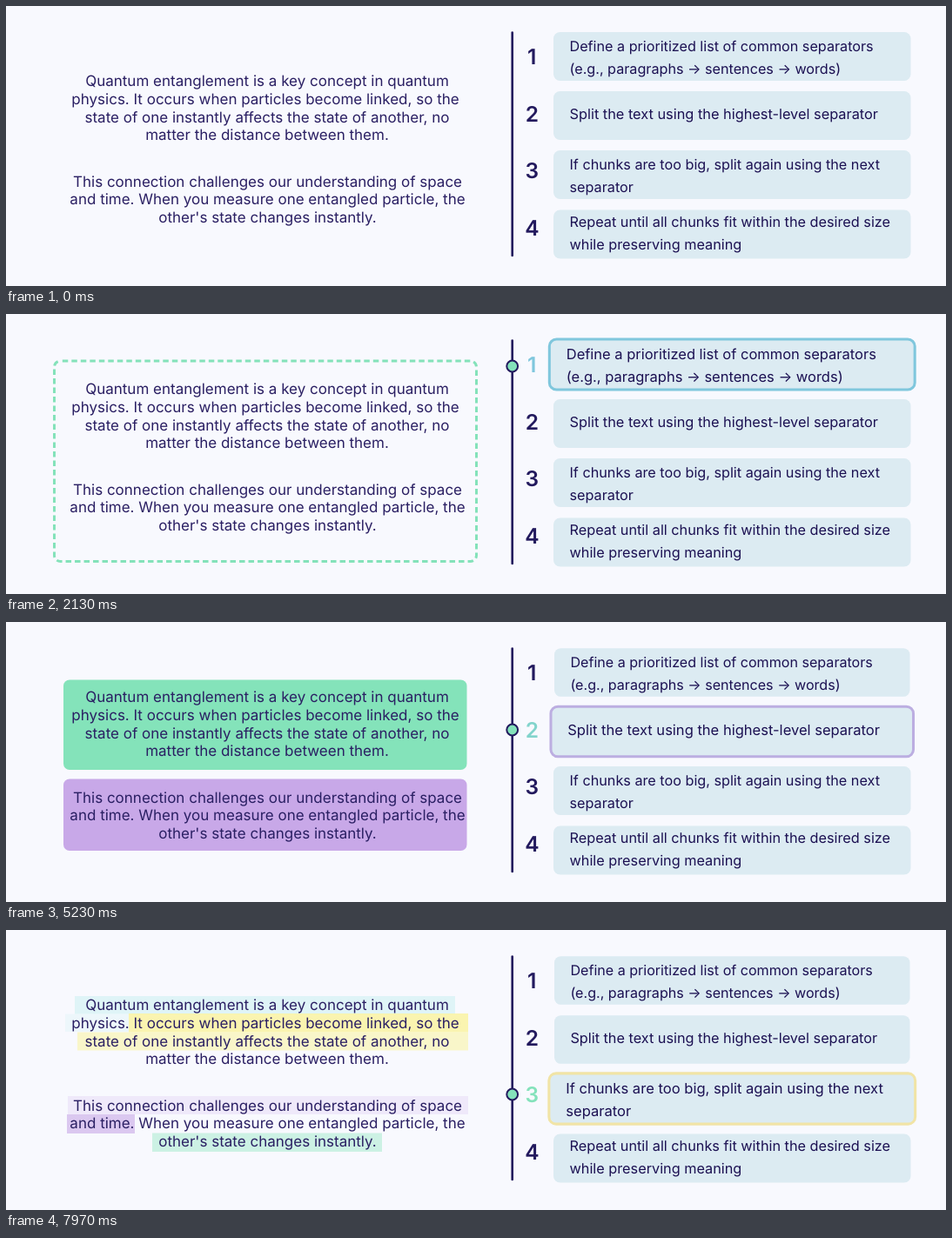
Write an HTML page that moves like this. It is 1080 px wide and 322 px high and loops after 8 s.

```html
<!DOCTYPE html>
<html lang="en">
<head>
<meta charset="utf-8">
<title>Recursive text splitting</title>
<style>
  html, body { margin: 0; width: 100%; height: 100%; overflow: hidden; background: #f8f9fe; }
  svg { display: block; width: 100vw; height: 100vh; }
  text { font-family: Inter, sans-serif; text-rendering: geometricPrecision; }
  .passage { font-size: 17px; fill: #2a1f63; text-anchor: middle; }
  .label { fill: #1b1052; }
  .number { font-size: 24.5px; font-weight: 600; text-anchor: middle; }
</style>
</head>
<body>
<svg id="stage" viewBox="0 0 1080 322"></svg>
<script>
const LOOP = 8000;
const NAVY = [35, 26, 94], GREEN = [132, 226, 186], BLUE = [128, 199, 221];
const LILAC = [188, 174, 225], YELLOW = [241, 228, 166];
const AXIS = 581.7;
const stage = document.getElementById('stage');

function add(parent, tag, attrs, text) {
  const el = document.createElementNS('http://www.w3.org/2000/svg', tag);
  set(el, attrs);
  if (text) el.textContent = text;
  parent.append(el);
  return el;
}
function set(el, attrs) {
  for (const key in attrs) el.setAttribute(key, attrs[key]);
}

const clamp = p => Math.min(1, Math.max(0, p));
const smooth = p => (1 - Math.cos(Math.PI * clamp(p))) / 2;
const ramp = (t, from, to) => clamp((t - from) / (to - from));
const backIn = p => 2.70158 * p ** 3 - 1.70158 * p ** 2;
const mix = (a, b, p) => a.map((v, i) => v + (b[i] - v) * p);
const rgb = c => `rgb(${c.map(Math.round)})`;
const zoom = (x, y, s) => `translate(${x} ${y}) scale(${s}) translate(${-x} ${-y})`;

// Smooth interpolation through [time, value] points
function track(t, points) {
  for (let i = 1; i < points.length; i++) {
    const [t0, a] = points[i - 1], [t1, b] = points[i];
    if (t < t1) return a + (b - a) * smooth((t - t0) / (t1 - t0));
  }
  return points[points.length - 1][1];
}

// Pop in and out with overshoot: how far the part is from its full pose
function pop(t, start, end) {
  const into = clamp((t - start) / 600), out = clamp((t - end) / 610);
  return {
    shrink: out > 0 ? backIn(out) : backIn(1 - into),
    alpha: out > 0 ? 1 - out ** 1.4 : clamp(into * 2)
  };
}

// Highlights behind the passage
const frame = add(stage, 'rect', {
  x: 55.5, y: 54, width: 485, height: 230.5, rx: 7, fill: 'none',
  stroke: rgb(GREEN), 'stroke-width': 3, 'stroke-dasharray': '6.5 4'
});
const blocks = add(stage, 'g', {});
add(blocks, 'rect', { x: 66, y: 66.5, width: 463.5, height: 103.5, rx: 7, fill: '#84e3ba' });
add(blocks, 'rect', { x: 66, y: 180.5, width: 463.5, height: 82.5, rx: 7, fill: '#c8a8e8' });

const marks = [
  [79, 76, 437, 20.5, '#a5e6e4', 7715],
  [68, 96.5, 73, 20.5, '#a5e6e4', 7860],
  [141, 96, 390, 21.5, '#fbf496', 7330],
  [82, 117.5, 449, 21, '#fbf496', 7545],
  [71, 191, 460, 21, '#c8a8e8', 7800],
  [70, 212, 78, 22, '#c8a8e8', 7460],
  [168, 233.5, 264, 21.5, '#84e3ba', 7645]
].map(([x, y, width, height, fill, start]) =>
  ({ start, el: add(stage, 'rect', { x, y, width, height, fill }) }));

[
  [300, 92.3, 'Quantum entanglement is a key concept in quantum'],
  [298, 113, 'physics. It occurs when particles become linked, so the'],
  [300, 133.8, 'state of one instantly affects the state of another, no'],
  [300, 154.4, 'matter the distance between them.'],
  [300.5, 207.8, 'This connection challenges our understanding of space'],
  [300.5, 228.4, 'and time. When you measure one entangled particle, the'],
  [300.5, 249, "other's state changes instantly."]
].forEach(([x, y, line]) => add(stage, 'text', { class: 'passage', x, y }, line));

add(stage, 'path', {
  d: `M${AXIS} 30.5V287`, stroke: rgb(NAVY), 'stroke-width': 2.6, 'stroke-linecap': 'round'
});

// y: box centre, dotY: marker centre, base: first baseline, size: label font size,
// start/end: active time, peak: moment of the accent colour after start
const steps = [
  { y: 58, dotY: 60, digit: 66.7, base: 51.8, size: 16.18,
    start: 15, end: 2820, accent: BLUE, peak: 2100,
    lines: ['Define a prioritized list of common separators', '(e.g., paragraphs → sentences → words)'] },
  { y: 126, dotY: 124, digit: 133, base: 130, size: 16.33,
    start: 3980, end: 6500, accent: LILAC, peak: 1300,
    lines: ['Split the text using the highest-level separator'] },
  { y: 194, dotY: 189, digit: 197.7, base: 188, size: 16.22,
    start: 7270, end: 1e5, accent: YELLOW, peak: 720,
    lines: ['If chunks are too big, split again using the next', 'separator'] },
  { y: 262.5, dotY: 255, digit: 263.7, base: 254, size: 16.25,
    start: 1e5, end: 2e5, accent: GREEN, peak: 0,
    lines: ['Repeat until all chunks fit within the desired size', 'while preserving meaning'] }
];

steps.forEach((s, i) => {
  s.card = add(stage, 'g', {});
  add(s.card, 'rect', {
    x: 629, y: s.y - 28, width: 410.5, height: 56, rx: 7.5, fill: '#dcebf2'
  });
  s.border = add(s.card, 'rect', {
    x: 628.5, y: s.y - 28.5, width: 411.5, height: 57, rx: 8, fill: 'none', 'stroke-width': 3
  });
  s.lines.forEach((line, n) => add(s.card, 'text', {
    class: 'label', x: 647.5, y: s.base + 26 * n, 'font-size': s.size
  }, line));
  s.number = add(stage, 'text', { class: 'number', x: 604.3, y: s.digit }, String(i + 1));
  s.dot = add(stage, 'circle', { cx: AXIS, cy: s.dotY, stroke: rgb(NAVY), 'stroke-width': 2 });
});

function cardScale(t, s) {
  const age = t - s.start, left = t - s.end;
  if (left > 0) return track(left, [[0, 1.02], [250, 1.031], [750, 0.995]]);
  if (age < 870) return track(age, [[0, 1], [300, 1.031], [870, 1.0205]]);
  return 1.016 + 0.0045 * Math.cos((age - 870) / 640 * 2 * Math.PI);
}

function drawStep(t, s) {
  const age = t - s.start, left = t - s.end;
  const lit = ramp(age, 0, 350) * (1 - ramp(left, 0, 450));
  const accent = 1 - smooth(Math.abs(age - s.peak) / 900);
  const tint = track(age, [[600, 0], [1900, 1]]);
  const { shrink } = pop(t, s.start, s.end);

  set(s.card, { transform: zoom(834.25, s.y, cardScale(t, s)) });
  set(s.border, {
    stroke: rgb(mix(GREEN, s.accent, accent)),
    opacity: ramp(age, 0, 300) * (1 - ramp(left, 550, 900))
  });
  set(s.number, { fill: rgb(mix(NAVY, mix(GREEN, BLUE, tint), lit)) });
  set(s.dot, {
    r: Math.max(0, 6.4 * (1 - shrink)),
    fill: rgb(mix(NAVY, GREEN, lit)),
    visibility: shrink < 1 ? 'visible' : 'hidden'
  });
}

function draw(t) {
  const outline = pop(t, 15, 2970);
  set(frame, {
    transform: zoom(298, 169.25, 1 - 0.33 * outline.shrink),
    opacity: outline.alpha,
    'stroke-dashoffset': -10.5 * t / 960
  });
  const fill = pop(t, 3980, 6500);
  set(blocks, { transform: zoom(297.75, 164.75, 1 - 0.2 * fill.shrink), opacity: fill.alpha });
  marks.forEach(m => set(m.el, { opacity: ramp(t, m.start, m.start + 850) }));
  steps.forEach(s => drawStep(t, s));
}

const begin = performance.now();
function tick() {
  draw((performance.now() - begin) % LOOP);
  requestAnimationFrame(tick);
}
tick();
</script>
</body>
</html>
```
